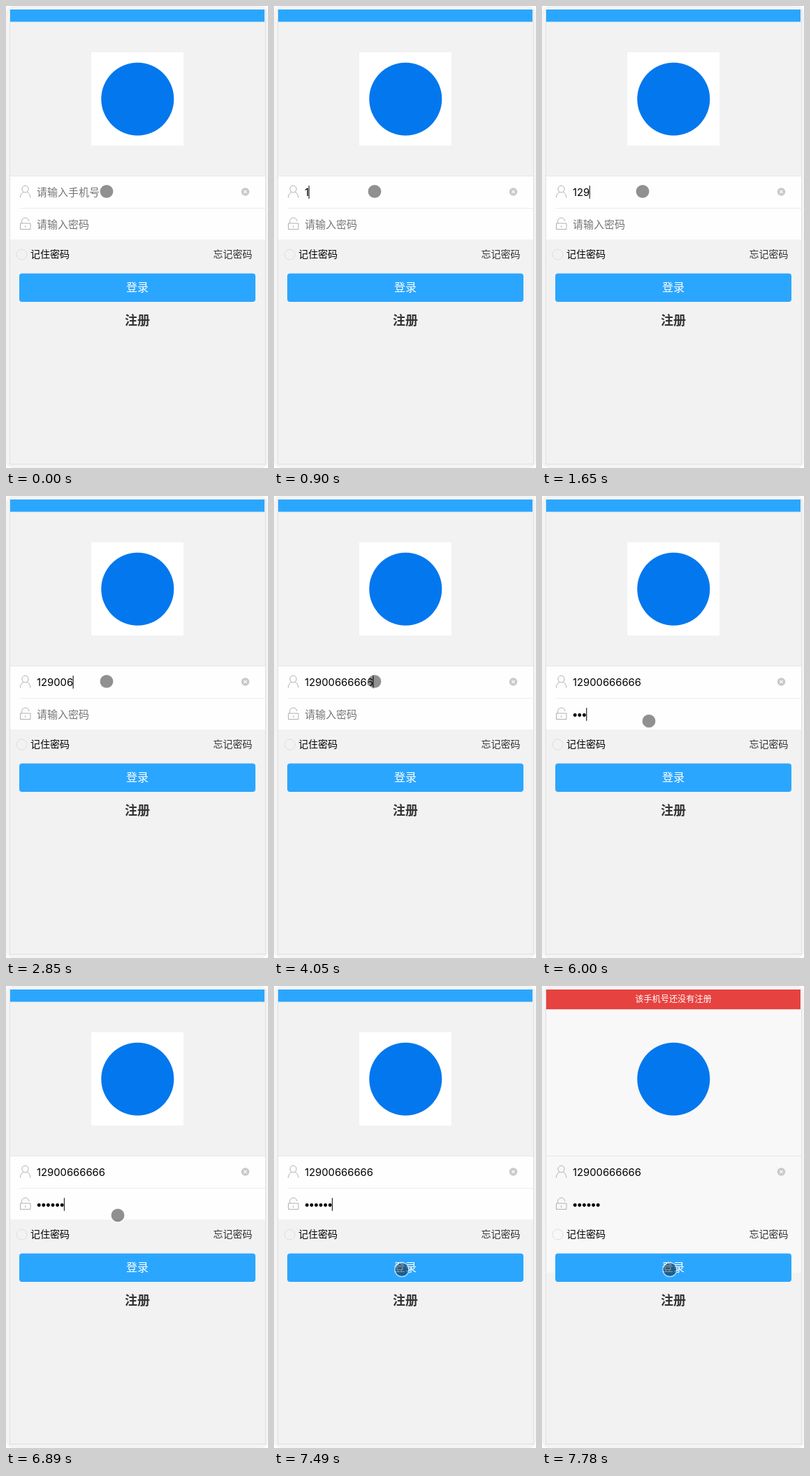
These frames come from a looping animation (375 by 659 pixels, 8 s). An HTML page with a canvas:

```html
<!DOCTYPE html>
<html lang="zh-CN">
<head>
<meta charset="utf-8">
<title>登录</title>
<style>
html, body { margin: 0; width: 100%; height: 100%; overflow: hidden; background: #fff; }
canvas { display: block; width: 375px; height: 659px; }
</style>
</head>
<body>
<canvas id="stage"></canvas>
<script>
const W = 375, H = 659, LOOP = 8000;
const BLUE = '#2ba6ff', GREY = '#f2f2f2', RED = '#e64340';
const CJK = '"Noto Sans CJK SC", "Noto Sans CJK", sans-serif';
const DIGITS = '14.8px Inter, "Liberation Sans", sans-serif';
const PHONE = '12900666666';

// Moments at which each character or position takes effect.
const phoneKeys = [900, 1350, 1650, 2100, 2400, 2850, 3150, 3300, 3750, 3900, 4050];
const passKeys = [5700, 5850, 6000, 6300, 6300, 6440];
const touchPath = [
  [0, 144, 264.5], [4650, 149, 293], [4800, 152, 314], [5850, 153, 321],
  [6890, 160, 327], [7040, 165, 344], [7190, 173, 371], [7340, 180, 394], [7490, 183, 404.5]
];

const canvas = document.getElementById('stage');
const ctx = canvas.getContext('2d');
const ratio = window.devicePixelRatio || 1;
canvas.width = W * ratio;
canvas.height = H * ratio;

const within = (t, from, to) => t >= from && t < to;
const typed = (keys, t) => keys.filter(k => t >= k).length;

function box(x, y, w, h, color, radius = 0) {
  ctx.fillStyle = color;
  ctx.beginPath();
  ctx.roundRect(x, y, w, h, radius);
  ctx.fill();
}

function disc(x, y, r, color) {
  ctx.fillStyle = color;
  ctx.beginPath();
  ctx.arc(x, y, r, 0, Math.PI * 2);
  ctx.fill();
}

function line(path, color, width = 1) {
  ctx.strokeStyle = color;
  ctx.lineWidth = width;
  ctx.stroke(new Path2D(path));
}

function label(text, x, y, font, color, align = 'left') {
  ctx.font = font;
  ctx.fillStyle = color;
  ctx.textAlign = align;
  ctx.fillText(text, x, y);
}

function caret(x, y) {
  box(x, y, 1.3, 18.5, '#333');
}

function drawShell(alert) {
  box(0, 0, W, H, '#fff');
  box(0, 0, W, H, '#f4f4f4', 10);
  box(5, 5, 367, 649, '#dfdfdf');
  box(6, 5, 365, 648, GREY);
  if (alert) box(6, 5, 365, 404, '#f8f8f8');
  box(6, 5, 364, 17.5, BLUE);
}

function drawLogo(alert) {
  if (!alert) box(122, 66, 132, 133, '#fff');
  disc(188.3, 132.7, 52, '#0377ee');
}

function drawIcons() {
  const ink = '#b0b0b0';
  line('M27.5 256.2a4.6 4.9 0 1 1 0 9.8a4.6 4.9 0 1 1 0 -9.8', ink);
  line('M20.3 273.5C20.5 269.5 22 267 25 265.4M30.2 265.4C33.2 267 34.7 269.5 34.9 273.5', ink);
  line('M20.5 310h14.5v8.5h-14.5zM22.5 310v-2.4a5.2 5.2 0 0 1 10.4 -.6M27.7 313v3', ink);
  disc(342.5, 265, 5.8, '#c9c9c9');
  line('M340.3 262.8l4.4 4.4M344.7 262.8l-4.4 4.4', '#fff', 1.1);
  line('M22.5 347a7.5 7.5 0 1 1 0 15a7.5 7.5 0 1 1 0 -15', '#dedede');
}

function drawPhone(t) {
  const text = PHONE.slice(0, typed(phoneKeys, t));
  if (text) label(text, 44, 271, DIGITS, '#000');
  else label('请输入手机号', 44, 271, '15px ' + CJK, '#757575');
  ctx.font = DIGITS;
  if (within(t, 600, 4800)) caret(43.4 + ctx.measureText(text).width, 256.3);
}

function drawPassword(t) {
  const count = typed(passKeys, t);
  if (!count) label('请输入密码', 44, 317, '15px ' + CJK, '#757575');
  for (let i = 0; i < count; i++) disc(47.2 + i * 6.6, 312.5, 2.45, '#000');
  const shown = within(t, 5100, 5550) || within(t, 5700, 7630);
  if (shown) caret(43.4 + count * 6.57, 302.3);
}

function drawForm(t, alert) {
  if (!alert) box(6, 243, 365, 90, '#fefefe');
  box(6, 242, 365, 1, '#e6e6e6');
  if (!alert) box(19, 288, 352, 1, '#ececec');
  drawIcons();
  drawPhone(t);
  drawPassword(t);
  label('记住密码', 35, 359.3, '14px ' + CJK, '#000');
  label('忘记密码', 352.5, 359.3, '14px ' + CJK, '#333', 'right');
  box(19, 381.5, 338, 40.5, BLUE, 4);
  label('登录', 188, 407, '16px ' + CJK, '#fff', 'center');
  label('注册', 188, 455.3, 'bold 18px ' + CJK, '#333', 'center');
}

function drawAlert(t) {
  const height = 28.5;
  const shift = t < 7780 ? -height / 2 : 0;
  ctx.save();
  ctx.beginPath();
  ctx.rect(6, 5, 364, height);
  ctx.clip();
  box(6, 5 + shift, 364, height, RED);
  label('该手机号还没有注册', 188, 22.7 + shift, '12.2px ' + CJK, '#fff', 'center');
  ctx.restore();
}

function drawTouch(t) {
  const [, x, y] = touchPath.filter(p => t >= p[0]).pop();
  disc(x, y, 9.6, 'rgba(0,0,0,.43)');
  ctx.strokeStyle = 'rgba(255,255,255,.55)';
  ctx.lineWidth = 1.5;
  ctx.beginPath();
  ctx.arc(x, y, 10.1, 0, Math.PI * 2);
  ctx.stroke();
}

function draw(t) {
  const alert = t >= 7630;
  ctx.setTransform(ratio, 0, 0, ratio, 0, 0);
  drawShell(alert);
  drawLogo(alert);
  drawForm(t, alert);
  if (alert) drawAlert(t);
  drawTouch(t);
}

const start = performance.now();
function tick() {
  draw((performance.now() - start) % LOOP);
  requestAnimationFrame(tick);
}
tick();
</script>
</body>
</html>
```
